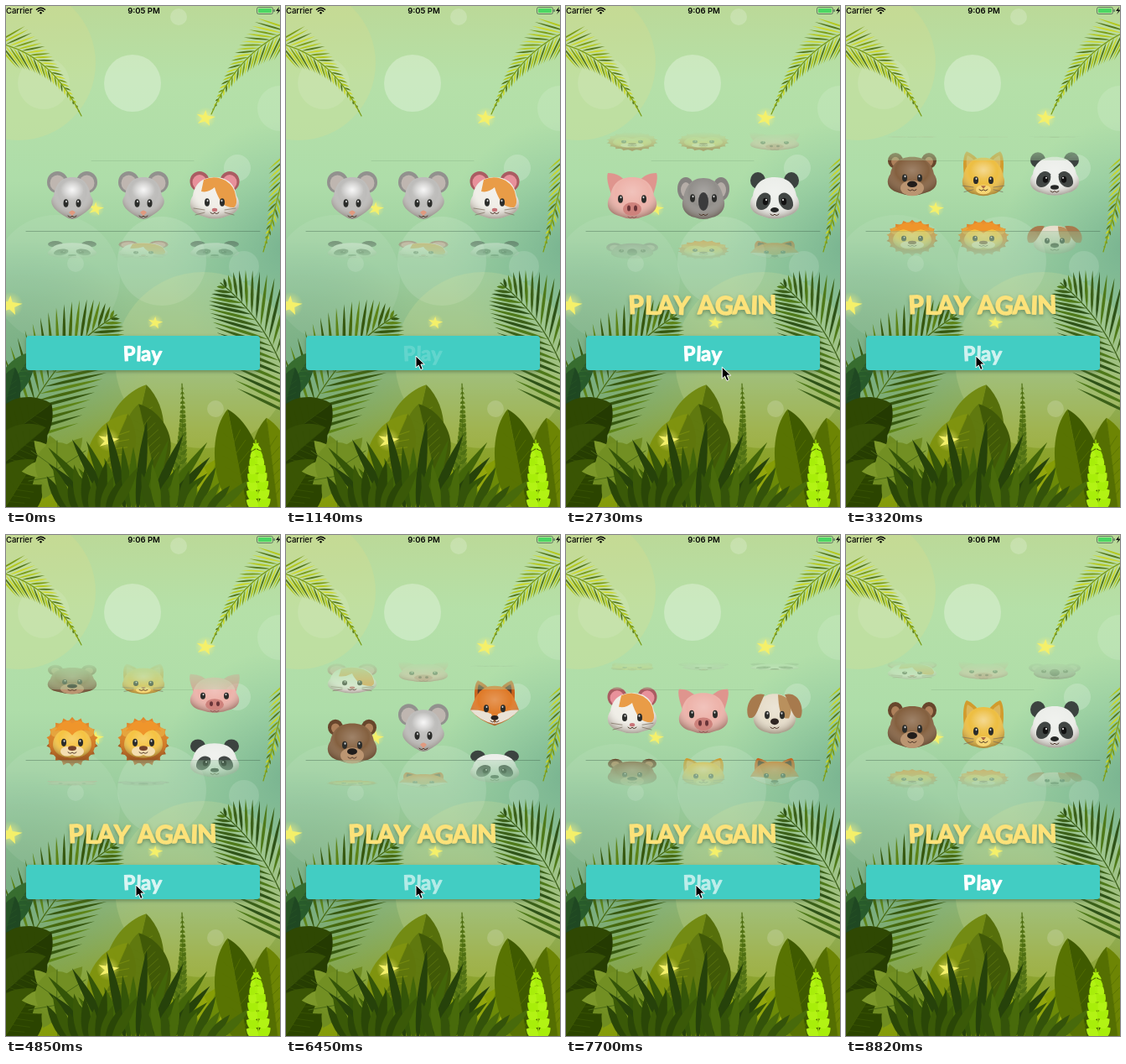
Write an HTML page that moves like this. It is 327 by 597 pixels and loops after 9.05 s.

```html
<!DOCTYPE html>
<html lang="en">
<head>
<meta charset="utf-8">
<title>Animal slots</title>
<style>
html, body { margin: 0; width: 100%; height: 100%; overflow: hidden; background: #a5d5a4; }
svg { display: block; width: 327px; height: 597px; }
text { text-anchor: middle; }
.status { font: 500 9.5px Inter, Roboto, sans-serif; }
.hand { font-family: Lato, "Open Sans", sans-serif; font-weight: 700; stroke-linejoin: round; }
</style>
</head>
<body>
<svg id="stage" viewBox="0 0 327 597" xmlns="http://www.w3.org/2000/svg"></svg>
<script>
const LOOP = 9050;
const STEP = 1.18, RADIUS = 70, MIDDLE = 226;
const COLUMNS = [79, 164, 249];
const $ = id => document.getElementById(id);
const mix = (a, b, k) => a + (b - a) * k;
const smooth = k => k * k * (3 - 2 * k);

// Shape helpers
const el = (x, y, rx, ry, fill, more = '') =>
  `<ellipse cx="${x}" cy="${y}" rx="${rx}" ry="${ry}" fill="${fill}" ${more}/>`;
const path = (d, fill, more = '') => `<path d="${d}" fill="${fill}" ${more}/>`;
const pair = (x, y, rx, ry, fill) => el(-x, y, rx, ry, fill) + el(x, y, rx, ry, fill);
const mirror = (d, fill) => path(d, fill) + path(d, fill, 'transform="scale(-1 1)"');
const line = (d, color, width) =>
  path(d, 'none', `stroke="${color}" stroke-width="${width}" stroke-linecap="round"`);

// Animal heads, centred on 0,0 in a 60 px square
const eyes = (x = 8, y = 8) => pair(x, y, 3, 4.8, '#2b2c2a') + pair(x - .5, y - 2, .9, 1.3, '#ddd');
const head = (d, fill) => path(d, fill) + path(d, 'url(#shade)');
const mouth = (y, color = '#4c3527') => line(`M-5 ${y}Q-2 ${y + 3} 0 ${y}Q2 ${y + 3} 5 ${y}`, color, 1);
const WIDE = 'M0 -22C17 -22 24 -12 26 0C33 11 28 21 16 24Q0 31 -16 24C-28 21 -33 11 -26 0C-24 -12 -17 -22 0 -22Z';
const TAPER = 'M0 -22C14 -22 20 -13 22 0C31 11 16 20 8 25Q0 31 -8 25C-16 20 -31 11 -22 0C-20 -13 -14 -22 0 -22Z';
const OVAL = 'M0 -21C15 -21 22 -10 24 4C28 14 21 24 10 26Q0 30 -10 26C-21 24 -28 14 -24 4C-22 -10 -15 -21 0 -21Z';
const pointedEars = (outer, inner) =>
  mirror('M-23 3C-25 -13 -24 -25 -20 -29C-13 -26 -8 -21 -4 -15Z', outer) +
  mirror('M-20 -9Q-21 -20 -19 -24Q-13 -21 -10 -16Z', inner);
const whiskers = line('M-12 17L-25 15M-12 20L-23 23M12 17L25 15M12 20L23 23', '#776a58', .7);

const animals = {
  mouse: pair(17.5, -16, 12.5, 13, '#92918e') + pair(17.5, -15, 9, 9.5, '#bfb6b0') +
    head(TAPER, '#bdbcba') + el(0, -7, 14, 12, 'url(#shine)') + eyes(7.5, 9) +
    path('M-4 20Q0 15 4 20L0 24Z', '#e09a80') + mouth(24),
  hamster: pair(18, -17, 11.5, 12, '#aa5c62') + pair(18, -16, 8.5, 9, '#e8919b') +
    head(WIDE, '#f0eee7') + path('M-13 -19Q0 -25 13 -18Q24 -11 25 0Q28 10 23 14Q13 14 8 8Q2 -2 0 -10Q-8 -3 -16 -5Z', '#e99c47') +
    eyes(9, 8) + el(0, 17, 3.2, 2.2, '#c77377') + mouth(20) + whiskers,
  bear: pair(20, -17, 9, 10, '#68462c') + pair(20, -16, 5, 6, '#ad805a') + head(WIDE, '#84603f') +
    el(0, 18, 14, 10, '#bb9571') + eyes(9, 5) + el(0, 13, 6, 4, '#211d1b') + mouth(20),
  cat: pointedEars('#d29b2d', '#dcb65a') + head(OVAL, '#edbe42') + el(0, -6, 15, 12, 'url(#shine)', 'opacity=".3"') +
    eyes(9, 8) + el(0, 20, 9, 6, '#f6d675') + path('M-3 15H3L0 19Z', '#a96944') + mouth(20) + whiskers,
  panda: pair(20, -18, 9, 10, '#3c4340') + head(WIDE, '#eceeea') +
    mirror('M-5 0C-12 -9 -23 1 -22 12C-19 23 -2 15 -5 0Z', '#414644') +
    pair(11, 7, 3.2, 4.3, '#111') + pair(10, 5, 1, 1.2, '#ddd') +
    el(0, 17, 5, 3, '#242625') + mouth(22),
  lion: Array.from({ length: 18 }, (_, i) =>
      `<g transform="rotate(${i * 20})">${path('M-7 -22L0 -31L7 -22Z', i > 4 && i < 14 ? '#a95f25' : '#df862b')}</g>`).join('') +
    el(0, 0, 28, 27, 'url(#mane)') + pair(20, -12, 6, 6, '#e5a43e') +
    head('M0 -17C15 -17 23 -7 23 4C22 15 12 20 0 20C-12 20 -22 15 -23 4C-23 -7 -15 -17 0 -17Z', '#f5c342') +
    path('M-21 -13Q-8 -32 0 -23Q13 -32 21 -13Q8 -18 0 -8Q-8 -18 -21 -13Z', '#ef952b') +
    pair(6, 12, 8, 6, '#f4deb0') + eyes(10, 1) + el(0, 8, 5, 3, '#76442a') + mouth(13),
  dog: head(OVAL, '#e6ddca') + path('M4 -20C18 -19 23 -4 17 9C8 11 5 0 4 -20Z', '#b9905d') +
    mirror('M-12 -20C-30 -25 -36 -1 -31 8C-22 12 -20 -4 -12 -20Z', '#a77a4d') +
    eyes(9, 5) + el(0, 13, 5, 4, '#302622') + mouth(20),
  pig: mirror('M-24 1Q-32 -20 -29 -27Q-14 -27 -7 -15Z', '#df958e') + head(WIDE, '#edb2a9') +
    eyes(14, 4) + el(0, 16, 11, 8, '#ce827c') + pair(4, 15, 2, 3.5, '#693438') + mouth(25, '#8f5450'),
  koala: pair(21, -8, 10, 14, '#85827f') + pair(21, -7, 6, 9, '#b5ada7') + head(OVAL, '#918e8a') +
    eyes(13, 3) + el(0, 7, 6, 11, '#3b3b3c') + mouth(22),
  fox: pointedEars('#c9641f', '#553b2a') +
    head('M0 -22C18 -22 23 -8 29 9Q18 23 0 29Q-18 23 -29 9C-23 -8 -18 -22 0 -22Z', '#df7a28') +
    mirror('M-29 9Q-16 8 -4 14L0 27Q-18 23 -29 9Z', '#e9e1d5') + eyes(10, 7) + el(0, 19, 4.5, 3, '#28211f') + mouth(23)
};

const reels = [
  'mouse panda mouse cat hamster bear lion pig koala',
  'mouse hamster mouse pig cat lion koala lion pig mouse fox',
  'hamster panda dog pig panda fox panda dog koala panda dog fox bear'
].map(r => r.split(' '));

// Foliage
const leaf = (x, y, angle, len, w, fill) =>
  path(`M0 0Q${len * .4} ${-w} ${len} 0Q${len * .4} ${w} 0 0`, fill,
    `transform="translate(${x.toFixed(1)} ${y.toFixed(1)}) rotate(${angle.toFixed(1)})"`);

// Leaflets shrink towards the end of the rib; a low taper power narrows it sooner
function frond([x0, y0, x1, y1, x2, y2], n, len, spread, w, taper, fills) {
  let out = '';
  for (let i = 0; i < n; i++) {
    const u = i / n, v = 1 - u;
    const x = v * v * x0 + 2 * u * v * x1 + u * u * x2;
    const y = v * v * y0 + 2 * u * v * y1 + u * u * y2;
    const a = Math.atan2(v * (y1 - y0) + u * (y2 - y1), v * (x1 - x0) + u * (x2 - x1)) * 180 / Math.PI;
    const size = len * (1 - u ** taper), turn = spread * (1 - .35 * u);
    out += leaf(x, y, a - turn, size, w, fills[i % fills.length]) +
      leaf(x, y, a + turn, size, w, fills[(i + 1) % fills.length]);
  }
  return out + line(`M${x0} ${y0}Q${x1} ${y1} ${x2} ${y2}`, fills[0], 1.2);
}

function broadLeaf(x, y, angle, len, w, fill, dark) {
  let veins = `M0 0H${len * .95}`;
  for (let i = 2; i < 8; i++) {
    const p = len * i / 10, h = w * .3 * Math.sin(Math.PI * i / 9);
    veins += `M${p} 0l${len * .1} ${h}M${p} 0l${len * .1} ${-h}`;
  }
  return `<g transform="translate(${x} ${y}) rotate(${angle})">` +
    path(`M0 0C${len * .2} ${-w * .75} ${len * .8} ${-w * .6} ${len} 0Z`, fill) +
    path(`M0 0C${len * .2} ${w * .75} ${len * .8} ${w * .6} ${len} 0Z`, dark) +
    line(veins, fill, .7) + '</g>';
}

const fan = (x, y, span, n, from, to, len, w, fills) => Array.from({ length: n }, (_, i) => {
  const k = i / (n - 1);
  return leaf(x + span * (k - .5), y, mix(from, to, k), len * (.8 + .2 * Math.sin(i * 2.3)), w, fills[i % fills.length]);
}).join('');

const sparkle = (x, y, s) => `<g transform="translate(${x} ${y}) rotate(8) scale(${s})">` +
  el(0, 0, 14, 14, 'url(#glow)') +
  path('M-1 -10L2 -3L13 -3L5 2L7 10L0 5L-9 9L-4 2L-12 -3L-3 -3Z', '#f4f06a') + '</g>';

const bubble = (x, y, r, a, fill = '#fff') => el(x, y, r, r, fill, `opacity="${a}"`);

function backdrop() {
  const lime = ['#7b9c16', '#b4c81c', '#54761b', '#cbd72a'];
  const palm = ['#46690f', '#5d8417', '#36580f'];
  const deep = ['#3c6119', '#4f7a1a', '#2f5318'];
  const dim = ['#6c8a08', '#93a60d'];
  return ['sky', 'side', 'left'].map(id => `<rect width="327" height="597" fill="url(#${id})"/>`).join('') +
    bubble(15, 68, 92, .2, '#e8dc83') + bubble(45, 92, 31, .1) + bubble(151, 92, 34, .29) +
    bubble(206, 13, 10, .2) + bubble(276, 193, 16, .2) + bubble(327, 122, 27, .12) +
    bubble(60, 325, 76, .07) + bubble(186, 304, 53, .12) + bubble(83, 307, 10, .13) +
    bubble(284, 310, 18, .13) + bubble(235, 422, 105, .2, '#dfe69c') +
    [[238, 133, .9], [107, 241, .75], [5, 356, 1.1], [178, 377, .7]].map(s => sparkle(...s)).join('') +
    frond([-12, 44, 52, 55, 90, 131], 24, 40, 40, 2, .9, lime) +
    frond([340, 28, 278, 52, 245, 129], 24, 42, 40, 2, .9, lime) +
    frond([336, 175, 324, 235, 307, 293], 18, 30, 38, 2, 1, lime) +
    frond([10, 520, 55, 415, 132, 368], 20, 80, 50, 3.6, 3, palm) +
    frond([348, 490, 325, 385, 256, 330], 20, 80, 52, 3.6, 3, deep) +
    path('M205 597Q230 535 275 535L327 560V597Z', '#869d06') +
    fan(250, 605, 60, 9, -130, -50, 70, 18, dim) +
    broadLeaf(140, 570, -77, 122, 68, '#738b13', '#566f0b') +
    broadLeaf(178, 560, -103, 88, 54, '#60790f', '#405907') +
    broadLeaf(108, 570, -66, 92, 52, '#7f930f', '#5f760c') +
    frond([206, 562, 213, 510, 210, 450], 20, 13, 42, 5, 1.2, ['#4e6f13', '#5d7c18']) +
    bubble(270, 510, 17, .22, '#eef1b4') + bubble(250, 480, 10, .17) +
    broadLeaf(290, 612, -101, 134, 54, '#587302', '#3f5a00') +
    broadLeaf(325, 605, -97, 115, 50, '#556f02', '#6d8504') +
    sparkle(122, 517, 1) +
    broadLeaf(-8, 470, -55, 70, 32, '#376d2f', '#285b2b') +
    broadLeaf(-8, 500, -75, 72, 30, '#265325', '#1f4822') +
    broadLeaf(-12, 522, -36, 82, 62, '#2f4803', '#243a02') +
    broadLeaf(-15, 555, -40, 82, 56, '#365006', '#263d02') +
    broadLeaf(-10, 612, -58, 84, 64, '#3a5504', '#2b4400') +
    fan(62, 549, 0, 13, -215, 115, 46, 20, ['#6f8c21', '#7c982a']) + el(62, 548, 27, 28, '#728f23') +
    line('M62 597Q60 570 61 518M61 552L30 530M61 552L95 530M61 560L27 566M61 560L95 564', '#496a14', 1) +
    fan(152, 605, 70, 17, -138, -42, 112, 11, ['#26420a', '#345508', '#426509']) +
    fan(100, 606, 50, 10, -120, -60, 66, 12, ['#2a4607', '#3a5908']) +
    fan(210, 606, 70, 10, -105, -42, 64, 11, ['#34530a', '#486a0b']) +
    frond([302, 607, 300, 560, 298, 517], 9, 17, 62, 13, 2.5, ['#a8ee0a', '#b2f314']);
}

const stops = list => list.map(([o, c, a = 1]) => `<stop offset="${o}" stop-color="${c}" stop-opacity="${a}"/>`).join('');
const radial = (id, place, list) => `<radialGradient id="${id}" ${place}>${stops(list)}</radialGradient>`;
const onStage = (x, y, r) => `gradientUnits="userSpaceOnUse" cx="${x}" cy="${y}" r="${r}"`;
const FAINT = .66;

const defs = `<defs>
  <linearGradient id="sky" x2="0" y2="1">${stops([[0, '#bbd998'], [.15, '#b5e0a8'], [.35, '#aedda9'],
    [.53, '#98cb9d'], [.72, '#91b779'], [.85, '#8fa63c'], [1, '#849b08']])}</linearGradient>
  ${radial('side', onStage(335, 285, 150), [[0, '#5b9d83', .55], [1, '#69b095', 0]])}
  ${radial('left', onStage(20, 430, 150), [[0, '#6eaa8a', .75], [1, '#6eaa8a', 0]])}
  ${radial('glow', '', [[0, '#fff9a0', .7], [1, '#f7ef67', 0]])}
  ${radial('shine', '', [[0, '#fff', .85], [1, '#fff', 0]])}
  ${radial('shade', 'cx=".5" cy=".35" r=".68"', [[0, '#fff', .22], [.5, '#fff', 0], [1, '#35200f', .45]])}
  <linearGradient id="mane" x2="0" y2="1">${stops([[0, '#e99232'], [.6, '#cf7c29'], [1, '#8c4c20']])}</linearGradient>
  <linearGradient id="fade" gradientUnits="userSpaceOnUse" x1="0" x2="0" y1="150" y2="304">${stops([[0, '#fff', 0],
    [.221, '#fff', FAINT], [.221, '#fff'], [.766, '#fff'], [.766, '#fff', FAINT], [1, '#fff', 0]])}</linearGradient>
  <mask id="window" maskUnits="userSpaceOnUse" x="24" y="150" width="279" height="154">
    <rect x="24" y="150" width="279" height="154" fill="url(#fade)"/></mask>
  <filter id="soft" x="-10%" y="-30%" width="120%" height="180%">
    <feDropShadow dx="0" dy="2" stdDeviation="2" flood-color="#35562d" flood-opacity=".5"/></filter>
  ${Object.entries(animals).map(([name, art]) => `<g id="${name}">${art}</g>`).join('')}
</defs>`;

const statusBar = `<g class="status"><text x="0" y="9" style="text-anchor:start">Carrier</text>
  <text id="clock" x="164.5" y="9" font-weight="600"></text></g>
  ${line('M36.5 4.2Q41.5 .2 46.5 4.2M38.3 6.2Q41.5 3.5 44.7 6.2', '#000', 1.4)}${el(41.5, 8.2, 1.2, 1.2, '#000')}
  <rect x="299.5" y="1.5" width="19" height="8" rx="2" fill="none" stroke="#486653" stroke-width=".8"/>
  <rect x="301" y="3" width="16" height="5" rx="1" fill="#4bd763"/><rect x="319.5" y="4" width="1.2" height="3" fill="#486653"/>
  ${path('M326 1L322 6H325L323 10L328 4.5H325Z', '#111')}`;

$('stage').innerHTML = defs + backdrop() +
  line('M102 184.5H224', 'rgba(60,95,70,.2)', .7) + line('M24 268.5H303', 'rgba(55,85,65,.45)', .8) +
  `<g mask="url(#window)">${reels.map((reel, c) =>
    reel.map((name, i) => `<use id="r${c}-${i}" href="#${name}"/>`).join('')).join('')}</g>
  <text id="again" class="hand" x="163.5" y="367" font-size="30" word-spacing="5" rotate="-3 2 -2 3 0 -2 3 -2 2 -2"
    fill="#fce27a" stroke="#fce27a" stroke-width="1.4" filter="url(#soft)">PLAY AGAIN</text>
  <rect x="24" y="393" width="279" height="41" rx="4" fill="#42cdc3" filter="url(#soft)"/>
  <text id="play" class="hand" x="163" y="423" font-size="24" rotate="-3 2 -2 3" fill="#fff" stroke="#fff" stroke-width="1">Play</text>
  ${statusBar}
  <path id="cursor" d="M0 0V14L3.3 11L5.6 16.5L8.2 15.4L5.9 10H10.4Z" fill="#000" stroke="#fff" stroke-width="1"/>`;

// Each spin: press, release, midpoint, stop; reel rows at the midpoint and at rest
const spins = [
  { t: [1140, 1300, 1490, 1600], mid: [6.8, 5.8, 3.8], to: [7, 6, 4], glow: 1 },
  { t: [3020, 3140, 3320, 3490], mid: [5.32, 4.32, 9.32], to: [5, 4, 9], glow: .75 },
  { t: [4510, 4680, 4850, 5030], mid: [5.75, 4.75, 3.48], to: [6, 10, 3], glow: .8 },
  { t: [6100, 6270, 6450, 6690], mid: [4.76, 8.95, 5.32], to: [3, 2, 12], glow: .6 },
  { t: [7410, 7520, 7660, 7820], mid: [4.2, 3.2, 10.2], to: [5, 4, 9], glow: .65 }
];
const HOLD = 50, DIM = .17;
const route = [
  [0, 303, -25], [480, 303, -20], [840, 155, 417], [1140, 155, 417], [1440, 335, 455],
  [2379, 335, 470], [2380, 281, 470], [2900, 155, 417], [8420, 155, 417], [8820, 300, 600], [LOOP, 300, 600]
];

function wheelAt(t) {
  let rows = [0, 0, 0];
  for (const { t: [press, start, middle, end], mid, to, glow } of spins) {
    if (t < press) break;
    if (t < start) return { rows, alpha: DIM };
    if (t < middle) {
      const k = (t - start) / (middle - start);
      return { rows: rows.map((r, c) => mix(r, mid[c], k)), alpha: mix(DIM, glow, k) };
    }
    if (t < end) {
      const k = Math.max(0, (t - middle - HOLD) / (end - middle - HOLD));
      return { rows: mid.map((r, c) => mix(r, to[c], k * (2 - k))), alpha: mix(glow, 1, k) };
    }
    rows = to;
  }
  return { rows, alpha: 1 };
}

function cursorAt(t) {
  const i = route.findIndex(p => p[0] > t);
  const [t0, x0, y0] = route[i - 1], [t1, x1, y1] = route[i];
  const k = smooth((t - t0) / (t1 - t0));
  return [mix(x0, x1, k), mix(y0, y1, k)];
}

function draw(t) {
  const { rows, alpha } = wheelAt(t);
  reels.forEach((reel, c) => reel.forEach((_, i) => {
    const angle = (i - rows[c]) * STEP, node = $(`r${c}-${i}`);
    const shown = Math.abs(angle) < Math.PI / 2;
    node.setAttribute('display', shown ? 'inline' : 'none');
    if (shown) node.setAttribute('transform',
      `translate(${COLUMNS[c]} ${MIDDLE + RADIUS * Math.sin(angle)}) scale(1 ${Math.cos(angle)})`);
  }));
  $('play').setAttribute('opacity', alpha);
  $('again').setAttribute('visibility', t < 1300 ? 'hidden' : 'visible');
  $('clock').textContent = t < 2080 ? '9:05 PM' : '9:06 PM';
  $('cursor').setAttribute('transform', `translate(${cursorAt(t)})`);
}

const began = performance.now();
function tick() {
  draw((performance.now() - began) % LOOP);
  requestAnimationFrame(tick);
}
tick();
</script>
</body>
</html>
```
